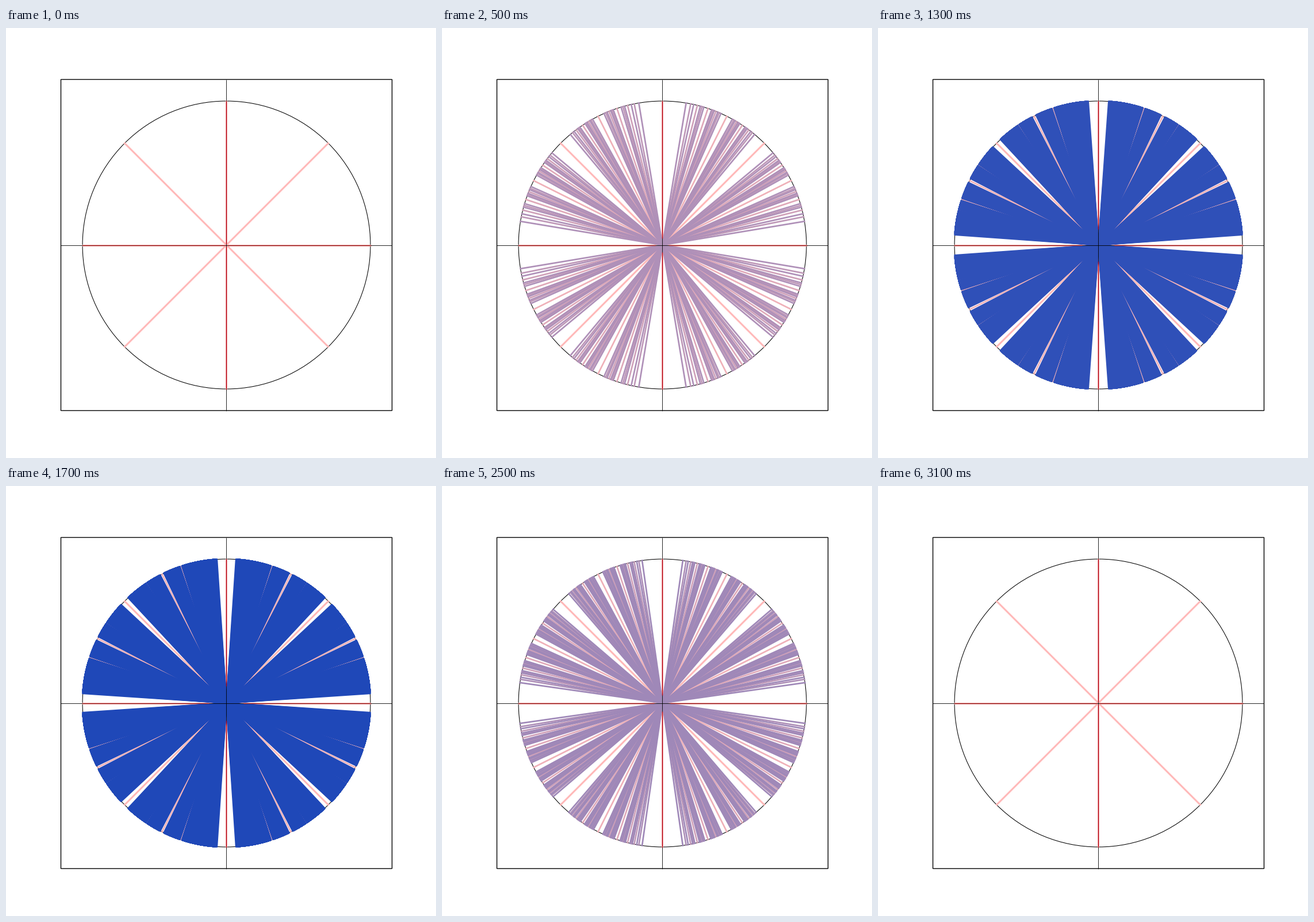
These frames come from a looping animation (748 by 748 pixels, 3200 ms). A matplotlib script:

```python
import numpy as np
import matplotlib.pyplot as plt
from matplotlib.animation import FuncAnimation
from matplotlib.collections import LineCollection
from matplotlib.patches import Circle, Rectangle

SIZE, DPI = 748, 100
PX = 72 / DPI
CX, CY, R, HALF = 383.5, 377.5, 250.43, 288
DEPTH = 16
MIN_STEP = 0.0007  # rays closer than this look the same


def level_color(k):
    return ((255 - 16 * k) / 255, (184 - 8 * k) / 255, 184 / 255)


def stern_brocot(depth):
    """Yield the angles of the new fractions in [0, 1], level by level."""
    p, q = np.array([0, 1]), np.array([1, 1])
    yield np.arctan2(p, q)
    for _ in range(depth - 1):
        mp, mq = p[:-1] + p[1:], q[:-1] + q[1:]
        yield np.arctan2(mp, mq)
        at = np.arange(1, len(p))
        p, q = np.insert(p, at, mp), np.insert(q, at, mq)


def diameters(angles):
    _, keep = np.unique(np.round(angles / MIN_STEP), return_index=True)
    a = angles[keep]
    a = np.concatenate([a, -a, np.pi / 2 - a, np.pi / 2 + a])
    step = R * np.column_stack([np.cos(a), np.sin(a)])
    mid = np.array([CX, CY])
    return np.stack([mid - step, mid + step], axis=1)


def lines(segments, color, width, z, cap="butt"):
    lc = LineCollection(segments, colors=[color], linewidths=width * PX,
                        capstyle=cap, zorder=z)
    ax.add_collection(lc, autolim=False)
    return lc


fig = plt.figure(figsize=(SIZE / DPI, SIZE / DPI), dpi=DPI, facecolor="white")
ax = fig.add_axes([0, 0, 1, 1])
ax.set_xlim(0, SIZE)
ax.set_ylim(SIZE, 0)
ax.axis("off")

ax.add_patch(Circle((CX, CY), R, fill=False, ec="black", lw=1.05 * PX, zorder=1))
levels = [lines(diameters(a), level_color(k), 2.67, 2 + k, "projecting")
          for k, a in enumerate(stern_brocot(DEPTH))]

lines([[(CX - HALF, CY), (CX + HALF, CY)], [(CX, CY - HALF), (CX, CY + HALF)]],
      (0, 0, 0, 0.85), 1, 30)
core_h = lines([], (0.55, 0.09, 0.09), 1.33, 31)
core_v = lines([], (0.67, 0.0, 0.06), 1.33, 31)
ax.add_patch(Rectangle((CX - HALF, CY - HALF), 2 * HALF, 2 * HALF, fill=False,
                       ec="black", lw=1.4 * PX, snap=False, zorder=32))


def update(i):
    k = min(i, 2 * DEPTH - 1 - i)
    for n, lc in enumerate(levels):
        lc.set_visible(n <= k)
    inner = 2 * (k + 1)
    core_h.set_segments([[(CX + s * inner, CY), (CX + s * R, CY)] for s in (-1, 1)])
    core_v.set_segments([[(CX, CY + s * inner), (CX, CY + s * R)] for s in (-1, 1)])
    return levels + [core_h, core_v]


anim = FuncAnimation(fig, update, frames=2 * DEPTH, interval=100,
                     init_func=lambda: update(0), repeat=True, repeat_delay=0)
plt.show()
```
